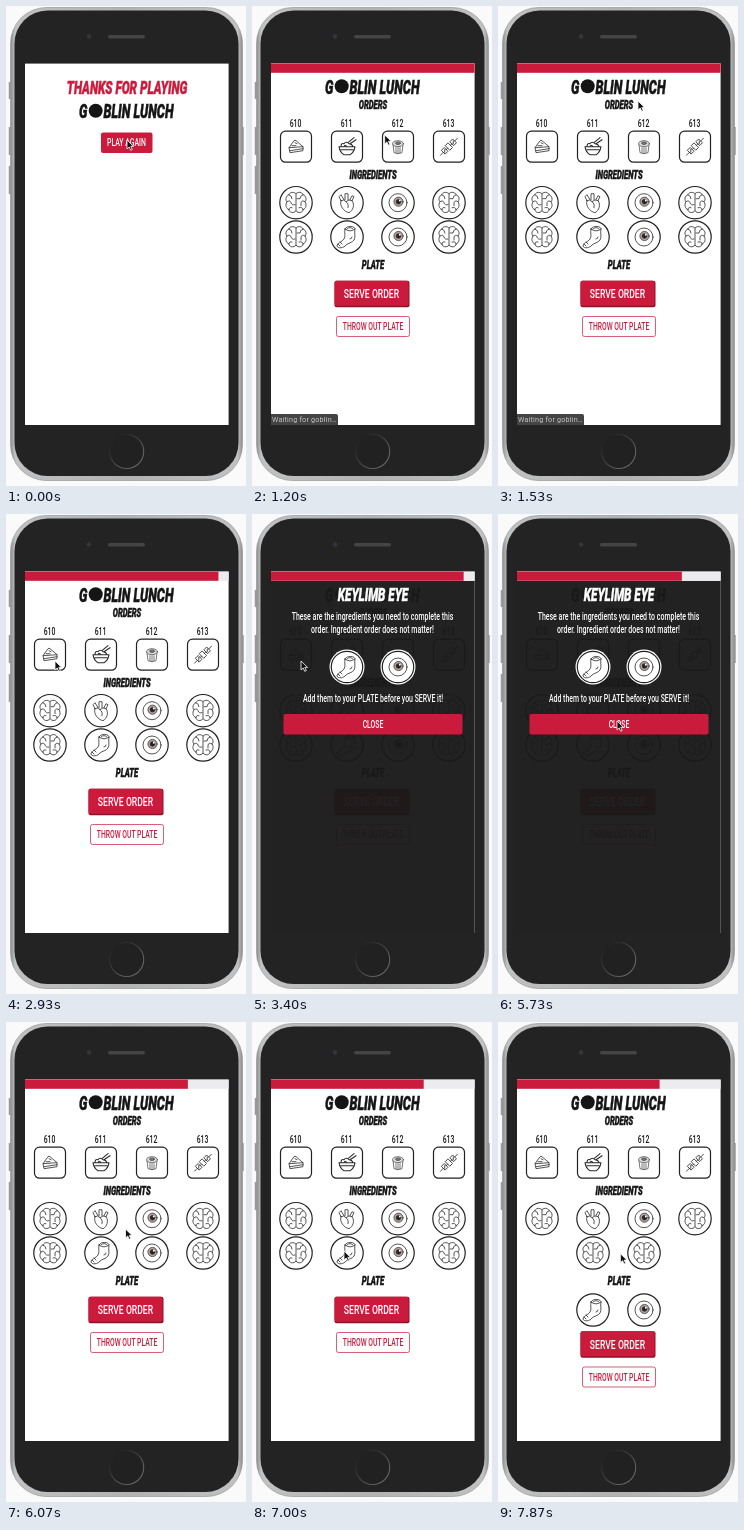
An HTML page for the animation above (8000 ms loop, 240 by 480 pixels).

```html
<!DOCTYPE html>
<html lang="en">
<head>
<meta charset="utf-8">
<title>Goblin Lunch</title>
<style>
  html, body { margin: 0; width: 100%; height: 100%; overflow: hidden; background: #fafafa; }
  svg { display: block; width: 100vw; height: 100vh; }
  text { font-family: Roboto, "Liberation Sans", sans-serif; }
  .head { font-weight: 900; font-style: italic; stroke-width: .5; }
  .body { font-weight: 500; }
  .icon { fill: none; stroke: #2a2a2a; stroke-width: .8; stroke-linejoin: round; stroke-linecap: round; }
</style>
</head>
<body>
<svg viewBox="0 0 240 480" xmlns="http://www.w3.org/2000/svg">
  <defs>
    <linearGradient id="metal" x2="1" y2="0">
      <stop offset="0" stop-color="#8a8c8e"/><stop offset=".02" stop-color="#bfc1c3"/>
      <stop offset=".5" stop-color="#b0b2b4"/>
      <stop offset=".98" stop-color="#bfc1c3"/><stop offset="1" stop-color="#8a8c8e"/>
    </linearGradient>
    <linearGradient id="ring" x2="1" y2="1">
      <stop offset="0" stop-color="#151515"/><stop offset="1" stop-color="#777"/>
    </linearGradient>
    <g id="brain" class="icon">
      <path d="M0-9C-2-11-6-11-7-8C-10-7-11-3-9-1C-11 2-10 6-7 7C-7 10-2 11 0 8C2 11 7 10 7 7C10 6 11 2 9-1C11-3 10-7 7-8C6-11 2-11 0-9V8"/>
      <path d="M-7-8Q-4-7-4-4M-9-1Q-6-3-5 0T-1 2M-7 7Q-7 4-4 5M7-8Q4-7 4-4H1M9-1Q6-3 5 0V3M7 7Q7 4 3 5"/>
    </g>
    <g id="heart" class="icon">
      <path d="M-6-2C-8 3-3 9 2 10C6 8 8 2 5-2Q2-4-1-1Q-3-4-6-2ZM-6-2-8-6-6-8-3-3M-2-3V-9H1V-3M3-3 5-7 7-6 5-2M-1-1Q2 1 1 5"/>
    </g>
    <g id="eye" class="icon">
      <circle r="9"/>
      <circle cx=".5" cy="-1" r="4.6" fill="#b5a5a3" stroke-width=".7"/>
      <circle cx=".5" cy="-1" r="2.3" fill="#2a2020"/>
      <circle cx="1.8" cy="-2.2" r="1" fill="#fff" stroke="none"/>
    </g>
    <g id="foot" class="icon">
      <path d="M-2-8C-3-4-1-1-3 2C-5 5-10 6-10 9C-9 12-3 11-1 8C1 6 5 6 7 3C9 0 7-4 8-8C8-11 0-12-2-8ZM-2-8Q3-4 8-8M0-8Q3-11 6-8M-9 7-7 9M-7 5-5 7M3 2Q5 2 5 0"/>
    </g>
    <g id="pie" class="icon">
      <path d="M-7 1-2-6Q-1-7 0-6L7 0-7 1-6 6 7 4V0M-6 4 7 2M-4-1 0-1M-1-4 1-3"/>
    </g>
    <g id="bowl" class="icon">
      <path d="M-8 0H8Q7 6 3 8H-3Q-7 6-8 0ZM-6 0Q-6-4-3-3Q-1-6 2-3Q5-3 6 0M-3 0Q-2-3 0 0M1-4 7-9M3-3 9-7M-6 3H6" stroke-width="1.1"/>
    </g>
    <g id="cup" class="icon" style="stroke: #555">
      <path d="M-5-2-4 6Q0 8 4 6L5-2M-2 1V6M0 1V7M2 1V6"/>
      <ellipse cy="-3" rx="5.5" ry="3" fill="#ddd"/>
      <ellipse cy="-3.5" rx="2.5" ry="1.3" fill="#777"/>
    </g>
    <g id="kebab" class="icon" transform="rotate(45)">
      <path d="M0-12V-8M0-4V-2M0 2V4M0 8V12M-2.5-8H2.5V-4H-2.5ZM-3-2H3V2H-3ZM-2.5 4H2.5V8H-2.5ZM-1-7 1-5M-1 5 1 7"/>
    </g>
  </defs>

  <g id="phone">
    <path d="M4 76V93M4 121V149M4 160V188M236.5 121V149" stroke="#999" stroke-width="2.5"/>
    <rect x="4.5" y="1.5" width="232" height="473" rx="36" fill="url(#metal)" stroke="#999" stroke-width=".7"/>
    <rect x="8.5" y="4.5" width="224" height="465.5" rx="33" fill="#232323"/>
    <rect x="102" y="29" width="37" height="3.5" rx="1.7" fill="#444"/>
    <circle cx="83" cy="30.5" r="2.2" fill="#34363c"/>
    <circle cx="120.7" cy="445.5" r="17" fill="#212121" stroke="url(#ring)" stroke-width="1.1"/>
    <rect x="19" y="57.6" width="203.6" height="361.4" fill="#fff"/>
  </g>
  <g id="thanks"></g>
  <g id="game"></g>
  <g id="modal"></g>
  <g id="timer">
    <rect x="19" y="57.6" width="203.6" height="9.2" fill="#ececef"/>
    <rect id="bar" x="19" y="57.6" width="203.6" height="9.2" fill="#cb1b3c"/>
  </g>
  <g id="status">
    <path d="M19 408H84Q86 408 86 410V419H19Z" fill="#444"/>
    <text x="20" y="416" font-size="7.2" letter-spacing=".2" fill="#c4c4c4">Waiting for goblin…</text>
  </g>
  <path id="cursor" d="M0 0V9L2.2 7 3.7 10.3 5.3 9.6 3.8 6.4H6.6Z" fill="#111" stroke="#fff" stroke-width=".8"/>
</svg>
<script>
const $ = id => document.getElementById(id);
const RED = '#cb1b3c', INK = '#151515', MID = 120.5, GAP = 51;

// Both display faces are condensed by one fixed ratio each.
const text = (cls, ratio) => (s, x, y, size, fill = INK, anchor = 'middle') =>
  `<text class="${cls}" transform="translate(${x} ${y}) scale(${ratio} 1)" font-size="${size}" fill="${fill}" ` +
  `text-anchor="${anchor}"${cls === 'head' ? ` stroke="${fill}"` : ''}>${s}</text>`;
const head = text('head', .64), body = text('body', .66);

const box = (x, y, w, h, fill, stroke = 'none', r = 2) =>
  `<rect x="${x}" y="${y}" width="${w}" height="${h}" rx="${r}" fill="${fill}" stroke="${stroke}"/>`;
const icon = (name, x, y) => `<use href="#${name}" x="${x}" y="${y}"/>`;
const disc = (x, y, r, fill, stroke = 'none') =>
  `<circle cx="${x}" cy="${y}" r="${r}" fill="${fill}" stroke="${stroke}" stroke-width="1.2"/>`;
const logo = y => head('G', 73, y, 19.8, INK, 'start') + disc(89.7, y - 7.2, 7, INK) +
  head('BLIN LUNCH', 97.5, y, 19.8, INK, 'start');

const row = (items, y, draw) =>
  items.map((item, i) => draw(item, MID + (i - (items.length - 1) / 2) * GAP, y, i)).join('');
const order = (name, x, y, i) => body(610 + i, x - .5, y - 20, 10.4) +
  `<g stroke-width="1.2">${box(x - 15.5, y - 15.5, 31, 31, '#fff', '#222', 5)}</g>` + icon(name, x, y);
const part = (name, x, y) => disc(x, y, 16.2, '#fff', '#222') + icon(name, x, y);
const need = (name, x, y) => disc(x, y, 17.5, '#fff') + disc(x, y, 15.7, '#fff', '#222') + icon(name, x, y);

function game(plate) {
  const parts = ['brain', 'heart', 'eye', 'brain', 'brain', 'foot', 'eye', 'brain'];
  for (const name of plate) parts.splice(parts.lastIndexOf(name), 1);
  const dy = plate.length ? 34.5 : 0;
  return logo(87.5) + head('ORDERS', 121, 103, 12) +
    row(['pie', 'bowl', 'cup', 'kebab'], 140.7, order) +
    head('INGREDIENTS', 121, 172.5, 12) +
    row(parts.slice(0, 4), 196.7, part) + row(parts.slice(4), 231, part) +
    head('PLATE', 121, 262.5, 12) + row(plate, 288, part) +
    `<g transform="translate(0 ${dy})">` +
    box(82.5, 274.7, 75, 26.5, '#8e1029') + box(82.5, 274.7, 74, 25, RED) +
    body('SERVE ORDER', 119.5, 292.3, 13.1, '#fff') +
    `<g stroke-width=".7">${box(84.5, 310.5, 73, 20, '#fff', RED)}</g>` +
    body('THROW OUT PLATE', 121, 324, 10.3, RED) + '</g>';
}

$('thanks').innerHTML = head('THANKS FOR PLAYING', 121, 87.5, 18.5, RED) + logo(112) +
  box(95, 126.5, 51.5, 20.5, RED) + body('PLAY AGAIN', 120.5, 140.2, 10.5, '#fff');

$('modal').innerHTML = box(19, 66.8, 203.6, 352.2, 'rgba(25,25,25,.96)', 'none', 0) +
  head('KEYLIMB EYE', 121, 87, 18.3, '#fff') +
  body('These are the ingredients you need to complete this', MID, 105.8, 10.6, '#fff') +
  body('order. Ingredient order does not matter!', MID, 118.8, 10.6, '#fff') +
  row(['foot', 'eye'], 153, need) +
  body('Add them to your PLATE before you SERVE it!', 121, 188.3, 10.5, '#fff') +
  box(31.5, 200, 179, 20.5, RED) + body('CLOSE', 121, 214, 10.4, '#fff');

// time, x, y of the pointer tip
const path = [
  [0, 121, 134], [929, 121, 134], [930, 132, 133], [1130, 132, 132], [1530, 140, 95],
  [1930, 128, 103], [2800, 51, 146], [2930, 49, 147], [3400, 49, 147], [3700, 52, 148],
  [4200, 89, 160], [4730, 135, 178], [5070, 128, 203], [5450, 114, 206], [5800, 119.5, 207],
  [6330, 119.5, 207], [6620, 66, 219], [7000, 92, 229], [7200, 92, 229], [7650, 121, 231],
  [8000, 123, 232]
];
const clamp = v => Math.max(0, Math.min(1, v));
const smooth = v => v * v * (3 - 2 * v);

function pointer(t) {
  const i = path.findIndex(p => p[0] > t);
  const [t0, x0, y0] = path[i - 1], [t1, x1, y1] = path[i];
  const k = smooth((t - t0) / (t1 - t0));
  return [x0 + (x1 - x0) * k, y0 + (y1 - y0) * k];
}

// The bar loses 5% every second, easing over 600 ms.
function timeLeft(t) {
  let left = 1;
  for (let start = 2300; start < t; start += 1000) left -= .05 * smooth(clamp((t - start) / 600));
  return left;
}

const show = (id, on) => $(id).style.display = on ? '' : 'none';
let shown = -1;

function draw(t) {
  const count = t < 7200 ? 0 : t < 7700 ? 1 : 2;
  if (count !== shown) {
    $('game').innerHTML = game(['foot', 'eye'].slice(0, count));
    shown = count;
  }
  const playing = t >= 1130;
  show('thanks', !playing);
  show('game', playing);
  show('timer', playing);
  show('modal', t >= 3400 && t < 6070);
  $('bar').setAttribute('width', 203.6 * timeLeft(t));
  $('status').style.opacity = t < 930 ? 0 : 1 - clamp((t - 1900) / 200);
  $('cursor').setAttribute('transform', `translate(${pointer(t)})`);
}

const begin = performance.now();
function tick() {
  draw((performance.now() - begin) % 8000);
  requestAnimationFrame(tick);
}
tick();
</script>
</body>
</html>
```
